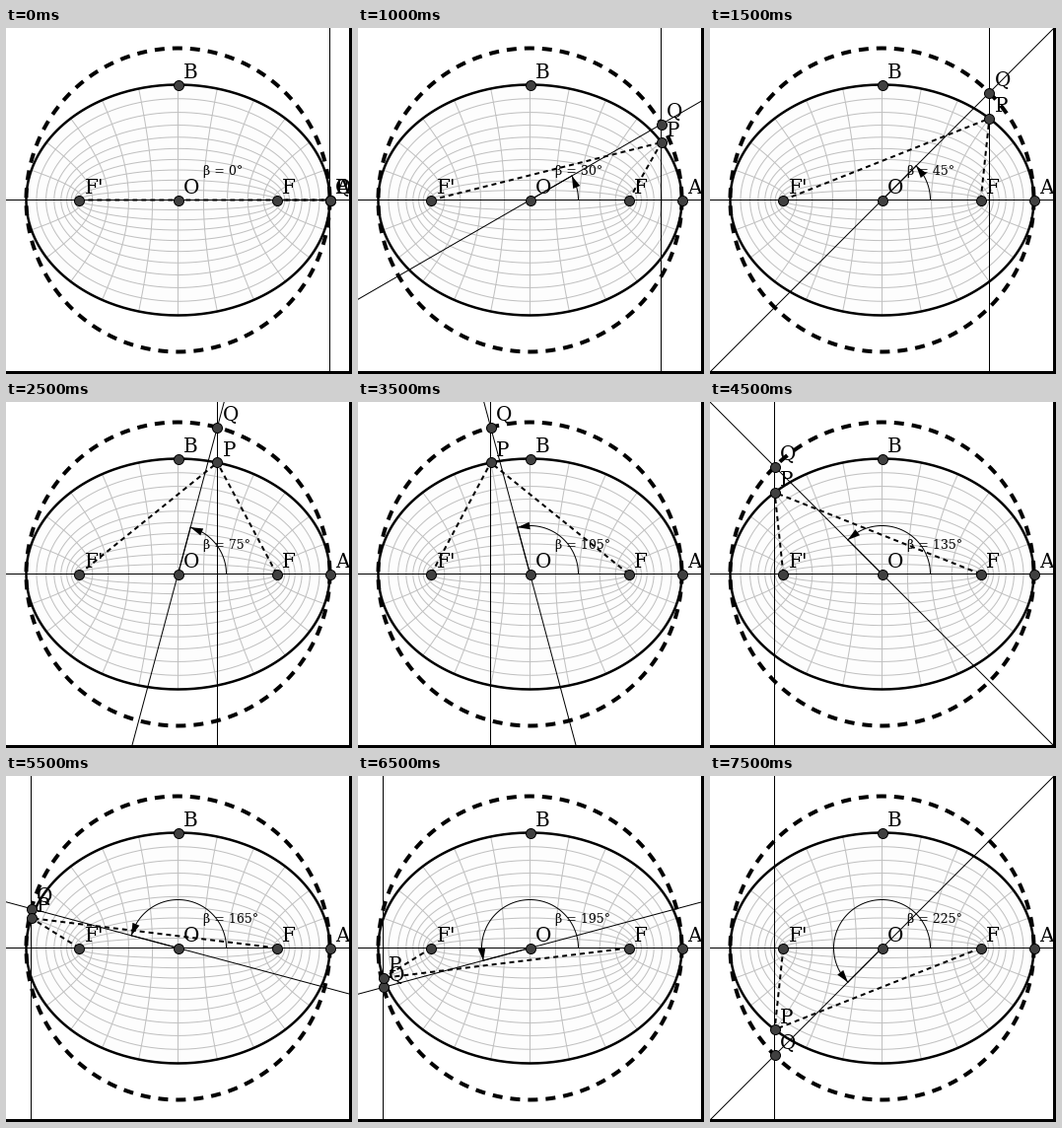
These frames come from a looping animation (351x351 px, 8 s). A matplotlib script:

```python
import numpy as np
import matplotlib.pyplot as plt
from matplotlib.animation import FuncAnimation
from matplotlib.patches import Ellipse, Polygon, Rectangle

SIZE, EDGE = 351, 348
CX = CY = 174.5
A, B = 154, 117
C = np.sqrt(A**2 - B**2)
ARC = 49
STEP = 15

# 72 dpi makes one point equal one pixel
fig = plt.figure(figsize=(SIZE / 72, SIZE / 72), dpi=72, facecolor="white")
ax = fig.add_axes([0, 0, 1, 1])
ax.set_xlim(0, SIZE)
ax.set_ylim(SIZE, 0)
ax.axis("off")


def line(x=(), y=(), width=1.0, color="black", z=3, **kw):
    return ax.plot(x, y, color=color, lw=width, zorder=z, snap=False, **kw)[0]


def dashed(x=(), y=(), width=1.0, on=5, off=4, z=5):
    return line(x, y, width, z=z, dashes=(on / width, off / width),
                dash_capstyle="butt")


def dot(x=0, y=0):
    return line([x], [y], z=6, marker="o", ms=10, mfc="#404040",
                mec="black", mew=1)


def label(text, x=0, y=0, size=20):
    return ax.text(x, y, text, family="DejaVu Serif", size=size, zorder=7,
                   ha="left", va="baseline")


def beside(x, y):
    return x + 5.5, y - 6.5


def on_arc(angle):
    return np.array([CX + ARC * np.cos(angle), CY - ARC * np.sin(angle)])


def elliptic(u, v):
    return CX + C * np.cosh(u) * np.cos(v), CY - C * np.sinh(u) * np.sin(v)


# confocal grid inside the ellipse
u_max = np.arcsinh(B / C)
turn = np.linspace(0, 2 * np.pi, 361)
ax.add_patch(Ellipse((CX, CY), 2 * A, 2 * B, fc="#fdfdfd", ec="none", zorder=1))
for u in np.arange(1, 10) / 10:
    line(*elliptic(u, turn), color="#c0c0c0", z=2)
for v in np.radians(np.arange(0, 360, STEP)):
    line(*elliptic(np.linspace(0, u_max, 60), v), color="#c0c0c0", z=2)

dashed(CX + A * np.cos(turn), CY + A * np.sin(turn), 4, 10, 8, z=4)
line(CX + A * np.cos(turn), CY + B * np.sin(turn), 2.5, z=4)
line([0, SIZE], [CY, CY])

for name, x, y in [("A", CX + A, CY), ("B", CX, CY - B), ("O", CX, CY),
                   ("F", CX + C, CY), ("F'", CX - C, CY)]:
    dot(x, y)
    label(name, *beside(x, y))

ray, side, upright, arc = (line() for _ in range(4))
radii = [(focus, dashed(width=2)) for focus in (CX - C, CX + C)]
head = ax.add_patch(Polygon(np.zeros((3, 2)), fc="black", ec="none", zorder=5))
q_dot, p_dot = dot(), dot()
q_name, p_name = label("Q"), label("P")
angle_text = label("", 200, 149, 12.5)

for corner, w, h in [((EDGE, 0), 3, SIZE), ((0, EDGE), SIZE, 3)]:
    ax.add_patch(Rectangle(corner, w, h, fc="black", ec="none", zorder=9))


def draw(i):
    beta = np.radians(STEP * i)
    cos, sin = np.cos(beta), np.sin(beta)
    x, qy, py = CX + A * cos, CY - A * sin, CY - B * sin

    reach = np.array([-400, 400])
    ray.set_data(CX + reach * cos, CY - reach * sin)
    column = np.floor(x) + 0.5  # keeps the thin line crisp
    upright.set_data([column, column], [0, SIZE])
    for focus, radius in radii:
        radius.set_data([focus, x], [CY, py])

    arc.set_data(*on_arc(np.linspace(0, beta, 120)))
    tip, tail = on_arc(beta), on_arc(beta - 12.5 / ARC)
    side.set_data([CX, tip[0]], [CY, tip[1]])
    d = (tip - tail) / np.hypot(*(tip - tail))
    normal = 3.8 * np.array([-d[1], d[0]])
    head.set_xy([tip, tail + normal, tail - normal])
    for part in (arc, side, head):
        part.set_visible(i > 0)

    for mark, name, y in [(q_dot, q_name, qy), (p_dot, p_name, py)]:
        mark.set_data([x], [y])
        name.set_position(beside(x, y))
    angle_text.set_text(f"β = {STEP * i}°")
    return ()


anim = FuncAnimation(fig, draw, frames=16, interval=500, repeat=True,
                     repeat_delay=0, blit=False)
plt.show()
```
